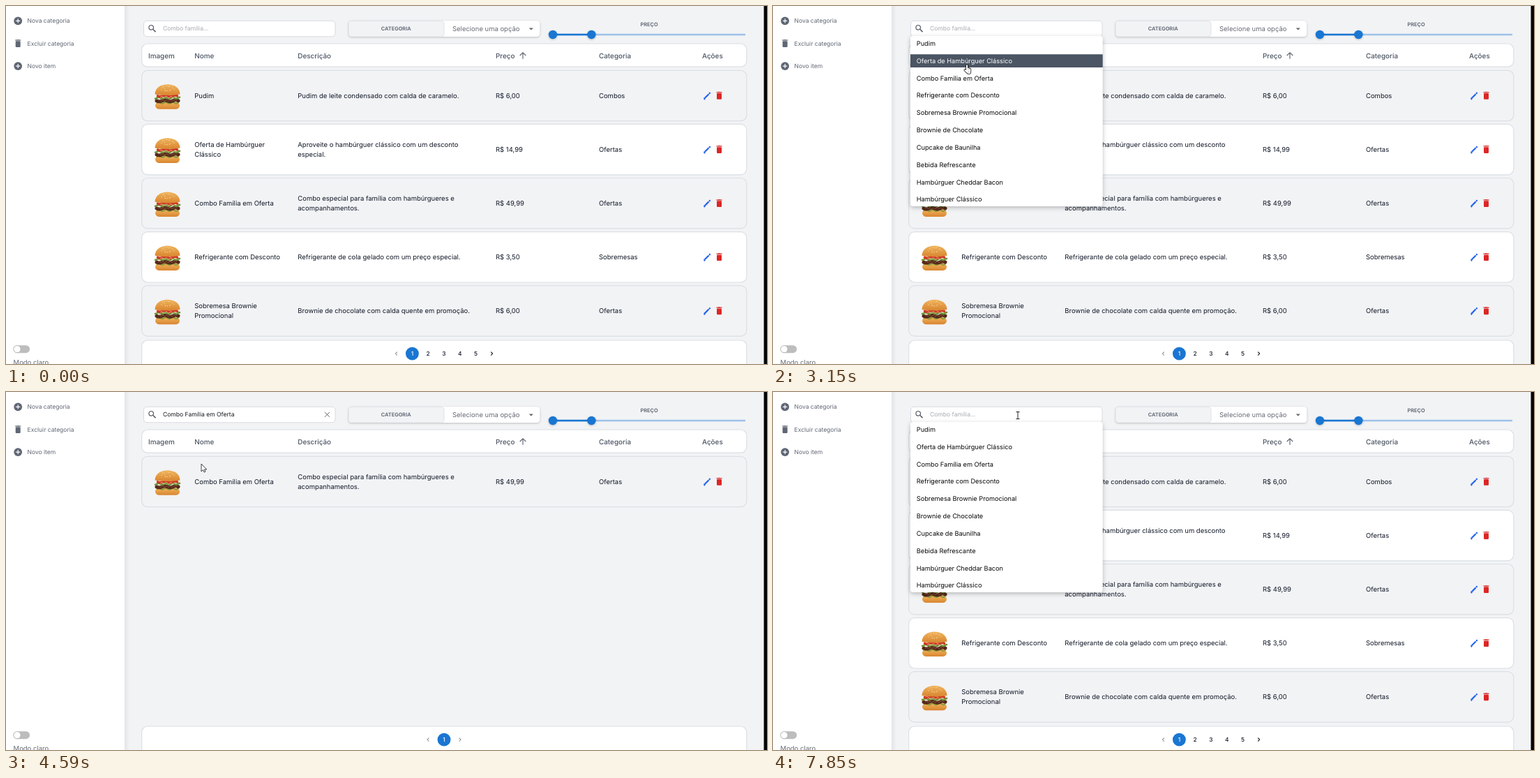
Animation of 1091 by 513 pixels, one loop 8000 ms. Source, as an HTML page:

```html
<!DOCTYPE html>
<html lang="pt-BR">
<head>
<meta charset="utf-8">
<title>Cardápio</title>
<style>
  html, body { margin: 0; width: 100%; height: 100%; overflow: hidden; background: #f2f3f5; }
  svg { display: block; width: 1091px; height: 513px; }
  text {
    font-family: Inter, "Noto Sans", sans-serif; font-size: 9.48px; fill: #111827;
    text-rendering: geometricPrecision; white-space: pre;
  }
  .nav { font-size: 8.5px; fill: #5f6673; }
  .soft { fill: #666b75; }
  .head { font-size: 9.9px; font-weight: 500; fill: #4b5563; }
  .cap { font-size: 7.4px; font-weight: 600; fill: #5b6270; text-anchor: middle; }
  .field { font-size: 8.55px; fill: #15181d; }
  .hint { font-size: 8.55px; fill: #a6aab1; }
  .page { font-size: 8.4px; font-weight: 500; text-anchor: middle; }
  .opt { font-size: 9.2px; fill: #08090b; }
  .on { fill: #fff; }
  .card { fill: #fff; stroke: #dcdfe4; stroke-width: 1.2; }
  .alt { fill: #f2f3f5; }
  .lift { filter: drop-shadow(0 1px 1.5px rgba(0, 0, 0, .22)); }
  .pop { filter: drop-shadow(0 2px 3px rgba(0, 0, 0, .25)); }
</style>
</head>
<body>
<svg id="stage" viewBox="0 0 1091 513" xmlns="http://www.w3.org/2000/svg"></svg>
<script>
const LOOP = 8000, STEP = 70, BLINK = 600;
const GRAY = '#5f6673', BLUE = '#1976d2';
const COL = { image: 204, name: 270.3, about: 418.3, price: 702, kind: 850, act: 998 };
const ROW = 77.1;                            // table pitch
const OPT = { top: 44.4, pitch: 24.83, h: 18.8 };

const ITEMS = [
  [['Pudim'], ['Pudim de leite condensado com calda de caramelo.'], 'R$ 6,00', 'Combos'],
  [['Oferta de Hambúrguer', 'Clássico'], ['Aproveite o hambúrguer clássico com um desconto', 'especial.'], 'R$ 14,99', 'Ofertas'],
  [['Combo Família em Oferta'], ['Combo especial para família com hambúrgueres e', 'acompanhamentos.'], 'R$ 49,99', 'Ofertas'],
  [['Refrigerante com Desconto'], ['Refrigerante de cola gelado com um preço especial.'], 'R$ 3,50', 'Sobremesas'],
  [['Sobremesa Brownie', 'Promocional'], ['Brownie de chocolate com calda quente em promoção.'], 'R$ 6,00', 'Ofertas']
];
const OPTIONS = [...ITEMS.map(r => r[0].join(' ')), 'Brownie de Chocolate', 'Cupcake de Baunilha',
  'Bebida Refrescante', 'Hambúrguer Cheddar Bacon', 'Hambúrguer Clássico'];

const text = (x, y, s, cls = '') => `<text x="${x}" y="${y}" class="${cls}">${s}</text>`;
const box = (x, y, w, h, r, attrs) => `<rect x="${x}" y="${y}" width="${w}" height="${h}" rx="${r}" ${attrs}/>`;
const dot = (x, y, r, fill, attrs = '') => `<circle cx="${x}" cy="${y}" r="${r}" fill="${fill}" ${attrs}/>`;
const line = (d, stroke, w, attrs = '') => `<path d="${d}" fill="none" stroke="${stroke}" stroke-width="${w}" ${attrs}/>`;
const at = (x, y, body, more = '') => `<g transform="translate(${x} ${y}) ${more}">${body}</g>`;
const card = (y, h, cls = '') => box(194.6, y, 867.2, h, 8.5, `class="card ${cls}"`);
const lines = (x, cy, list) =>
  list.map((s, i) => text(x, cy + 3.4 + (i - (list.length - 1) / 2) * 14.2, s)).join('');

// icons, centred on the origin
const ICON = {
  add: c => dot(0, 0, 5.9, c) + line('M-3 0H3M0-3V3', '#fff', 1.2),
  bin: c => box(-3.5, -3.4, 7, 8.7, 1.1, `fill="${c}"`) + line('M-4.1-4.7H4.1', c, 1.2) + line('M-1.700-5.200H1.700', c, .8),
  edit: c => box(-4.9, -1.1, 8.2, 2.2, 0, `fill="${c}"`) + box(4, -1.1, 2.3, 2.2, .4, `fill="${c}"`) +
    `<path d="M-4.900-1.600V1.600L-7.100 1.600V0Z" fill="${c}" transform="rotate(0)"/>`,
  find: c => `<circle cx="-1.500" cy="-1.500" r="3.300" fill="none" stroke="${c}" stroke-width="1.200"/>` + line('M.9.9L4.800 4.800', c, 1.5),
  up: c => line('M0 4.700V-4M-4.300 0L0-4.200L4.300 0', c, 1.15)
};
const icon = (name, x, y, color) => at(x, y, ICON[name](color), name === 'edit' ? 'rotate(-45)' : '');

// a wavy slice of filling
function slice(y, half, thick, waves, color) {
  const edge = [];
  for (let x = -half; x <= half; x++) edge.push(`${x} ${y + Math.sin(x / half * Math.PI * waves)}`);
  return line('M' + edge.join('L'), color, thick, 'stroke-linecap="round"');
}
function burger() {
  let seeds = '';
  for (let i = 0; i < 14; i++)
    seeds += dot(11 * Math.sin(i * 2.4) * Math.sqrt(i / 14), -11.5 + 3.5 * Math.cos(i * 2.4), .55, '#fbe6b8');
  return '<g id="burger">' +
    box(-17.5, 8, 35, 10.3, 6, 'fill="url(#bun)"') +
    slice(9.3, 15, 2, 3, '#8d9a3c') + slice(6.3, 15.5, 5, 2, '#54291a') + slice(6, 13, 1, 5, '#93553a') +
    slice(2.2, 17.5, 2.6, 3.5, '#6d9433') + slice(-.6, 14, 3.6, 2, '#cf3a24') + slice(1.2, 10, .9, 3, '#efc79a') +
    '<path d="M-18-3C-18-22 18-22 18-3Q0 0-18-3Z" fill="url(#bun)"/>' + seeds + '</g>';
}

function row([name, about, price, kind], i) {
  const top = 92.3 + ROW * i, c = top + 36.2;
  return card(top, 72.4, i % 2 ? '' : 'alt') + `<use href="#burger" x="231.5" y="${c + 1}"/>` +
    lines(COL.name, c, name) + lines(COL.about, c, about) + lines(COL.price, c, [price]) + lines(COL.kind, c, [kind]) +
    icon('edit', COL.act + 7.2, c, '#2563eb') + icon('bin', COL.act + 24.5, c, '#dc2626');
}

function pager(pages) {
  const gap = 22.8, x0 = 628 - (pages - 1) * gap / 2;
  const chevron = (x, s, color) => line(`M${x - s} 495.6l${2 * s} 2.5l${-2 * s} 2.5`, color, 1.2);
  let out = dot(x0, 498.1, 9.45, BLUE);
  for (let i = 0; i < pages; i++) out += text(x0 + gap * i, 501.1, i + 1, i ? 'page' : 'page on');
  return out + chevron(x0 - gap, -1.2, '#9a9a9a') + chevron(x0 + gap * pages, 1.2, pages > 1 ? '#222' : '#9a9a9a');
}

const nav = [['add', 'Nova categoria'], ['bin', 'Excluir categoria'], ['add', 'Novo item']]
  .map(([name, s], i) => icon(name, 17.2, 21.3 + 32.4 * i, GRAY) + text(30.6, 24.4 + 32.4 * i, s, 'nav'));
const heads = ['Imagem', 'Nome', 'Descrição', 'Preço', 'Categoria', 'Ações']
  .map((s, i) => text(Object.values(COL)[i], 74.5, s, 'head'));
const options = OPTIONS.map((s, i) => {
  const y = OPT.top + OPT.pitch * i;
  return `<g class="row">${box(197, y, 275.7, OPT.h, 0, 'fill="#4b5563"')}${text(205.8, y + 12.6, s, 'opt')}</g>`;
});
const hand = 'M0 1.200V9M-2.600 8L0 10.500M2.200 5.500V9M4.400 6.500V10M.5 9.500H4V12H1.500Z';
const round = 'stroke-linecap="round" stroke-linejoin="round"';

document.getElementById('stage').innerHTML = `
<defs>
  <linearGradient id="edge"><stop stop-color="#e2e4e7"/><stop offset="1" stop-color="#f2f3f5"/></linearGradient>
  <linearGradient id="bun" x2="0" y2="1"><stop stop-color="#f0b45c"/><stop offset="1" stop-color="#d98530"/></linearGradient>
  ${burger()}
</defs>
<rect width="1091" height="513" fill="#f2f3f5"/>
<rect x="170" width="7" height="513" fill="url(#edge)"/>
<rect width="170" height="513" fill="#fff"/>
${nav.join('')}
${box(10.5, 486.2, 23.6, 11, 5.5, 'fill="#bdbdbd"')}
${dot(16, 491.7, 5.1, '#fff', 'stroke="#aaa" stroke-width=".7"')}
${text(10.6, 514, 'Modo claro', 'soft')}

${box(197.5, 21.2, 274.5, 22.6, 4.5, 'fill="#fff" stroke="#d7dae0"')}
${icon('find', 209.7, 32.3, '#555a63')}
<g id="hint">${text(225, 35.2, 'Combo família...', 'hint')}</g>
<g id="value">${text(225, 35.2, 'Combo Família em Oferta', 'field')}${line('M457 28.800l7 7m0-7l-7 7', '#555', .9)}</g>

${box(491, 21.2, 274.4, 22.8, 4.5, 'fill="#fff" class="lift"')}
${box(491, 21.2, 137, 22.8, 4.5, 'fill="#f2f3f5" stroke="#d9dce1" stroke-width=".8"')}
${text(559.2, 34.8, 'CATEGORIA', 'cap')}
${text(640, 35.7, 'Selecione uma opção', 'soft')}
<path d="M749.700 31.500h6.200l-3.100 3.100z" fill="#666"/>
${text(922, 28.7, 'PREÇO', 'cap')}
${line('M784 41H1060', '#9dc2e9', 2.3)}${line('M784 41H839', BLUE, 2.3)}
${dot(784, 41, 6.2, BLUE, 'class="lift"')}${dot(839.4, 41, 6.2, BLUE, 'class="lift"')}

${card(54, 33.2)}${heads.join('')}${icon('up', 741, 71, GRAY)}
${card(479, 50)}
<g id="all">${ITEMS.map(row).join('')}${pager(5)}</g>
<g id="found">${row(ITEMS[2], 0)}${pager(1)}</g>
<rect x="1086.500" width="4.500" height="513" fill="#050505"/>

<g id="menu">${box(197, 43, 275.7, 244, 4, 'fill="#fff" class="pop"')}${options.join('')}</g>
<rect id="caret" x="225" y="26" width="1" height="12" fill="#222"/>
<g id="cursor">
  <path d="M0 0V11L2.500 8.500 4.200 12 6 11 4.300 8H7.700Z" fill="#fff" stroke="#111" stroke-width=".8"/>
  ${line('M-2.500-5H2.500M0-5V5M-2.500 5H2.500', '#222', 1)}
  <g>${line(hand, '#111', 3.6, round)}${line(hand, '#fff', 2, round)}</g>
</g>`;

const $ = id => document.getElementById(id);
const rows = [...document.querySelectorAll('.row')], shapes = [...$('cursor').children];
const show = (el, on) => { el.style.display = on ? '' : 'none'; };

function ramp(t, start, span = 4 * STEP) {
  const x = Math.max(0, Math.min(1, Math.floor((t - start) / STEP) * STEP / span));
  return x < .5 ? (2 * x) ** 2.5 / 2 : 1 - (2 - 2 * x) ** 2.5 / 2;
}

// pointer moves: start, steps, end x, end y
const MOVES = [
  [60, 9, 268, 42], [690, 3, 291.5, 30.3], [2590, 8, 278, 84],
  [3150, 6, 280, 103], [5110, 7, 459, 35], [6400, 7, 351, 33.5]
];
function pointer(t) {
  let x = 1030, y = 513;
  for (const [start, steps, toX, toY] of MOVES) {
    const p = ramp(t, start, steps * STEP);
    x += (toX - x) * p;
    y += (toY - y) * p;
  }
  return [x, y];
}

function draw(t) {
  const open = ramp(t, 2170) - ramp(t, 4170) + ramp(t, 7230);
  const filled = t >= 4170 && t < 6130, found = t >= 4590 && t < 6460;
  const [x, y] = pointer(t);

  show($('menu'), open > 0);
  $('menu').setAttribute('opacity', open);
  $('menu').setAttribute('transform', `translate(0 43) scale(1 ${open}) translate(0 -43)`);
  rows.forEach((el, i) => {
    const into = y - OPT.top - OPT.pitch * i, hot = into >= 0 && into < OPT.h;
    show(el.firstChild, hot);
    el.lastChild.classList.toggle('on', hot);
  });

  show($('value'), filled);
  show($('hint'), !filled);
  show($('found'), found);
  show($('all'), !found);

  const focus = t >= 7230 ? 7230 : t >= 2100 && t < 4170 ? 2100 : 0;
  show($('caret'), focus && Math.floor((t - focus) / BLINK) % 2 === 0);

  const inField = x > 197 && x < 472 && y > 21 && y < 44;
  const onLink = (open > 0 && y >= 44) || (filled && inField && x > 452);
  const look = onLink ? 2 : inField ? 1 : 0;
  show($('cursor'), t >= 130);
  $('cursor').setAttribute('transform', `translate(${x} ${y})`);
  shapes.forEach((s, i) => show(s, i === look));
}

function tick() {
  draw(performance.now() % LOOP);
  requestAnimationFrame(tick);
}
tick();
</script>
</body>
</html>
```
